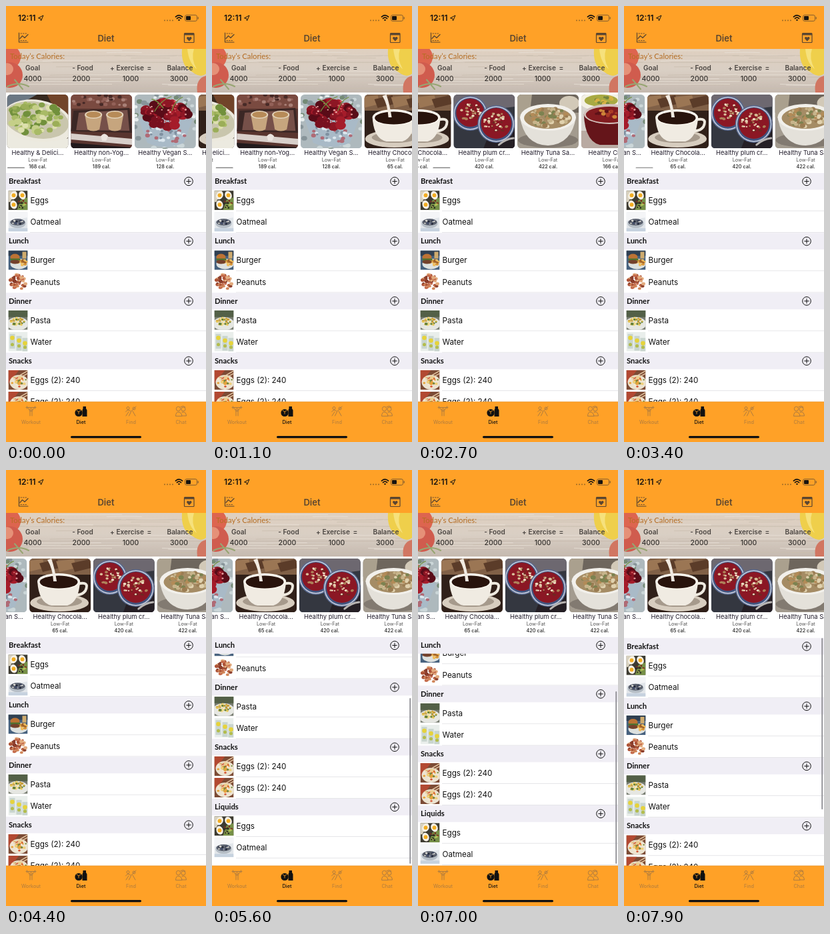
Animation of 300 by 650 pixels, one loop 8000 ms. Source, as an HTML page:

```html
<!DOCTYPE html>
<html lang="en">
<head>
<meta charset="utf-8">
<title>Diet</title>
<style>
  html, body { margin: 0; width: 100%; height: 100%; overflow: hidden; background: #fff; }
  svg { display: block; }
  text { font-family: Inter, Roboto, sans-serif; dominant-baseline: alphabetic; }
  .lato { font-family: Lato, "Open Sans", sans-serif; }
</style>
</head>
<body>
<svg id="stage" width="300" height="650" viewBox="0 0 300 650"></svg>
<script>
const ORANGE = '#ffa127', DIM = '#ad7b3f', PITCH = 95.7, TOP = 249, SECTION = 89.25, HEAD = 24.8, MAX = 106;

// Drawing helpers
const rect = (x, y, w, h, fill, extra = '') => `<rect x="${x}" y="${y}" width="${w}" height="${h}" fill="${fill}" ${extra}/>`;
const oval = (x, y, rx, ry, fill, extra = '') => `<ellipse cx="${x}" cy="${y}" rx="${rx}" ry="${ry}" fill="${fill}" ${extra}/>`;
const disc = (x, y, r, fill, extra) => oval(x, y, r, r, fill, extra);
const path = (d, fill = 'none', extra = '') => `<path d="${d}" fill="${fill}" ${extra}/>`;
const line = (d, color, width = 1) => path(d, 'none', `stroke="${color}" stroke-width="${width}" stroke-linecap="round" stroke-linejoin="round"`);
const text = (s, x, y, size, fill, weight = 400, anchor = 'middle', extra = '') =>
  `<text x="${x}" y="${y}" font-size="${size}" fill="${fill}" font-weight="${weight}" text-anchor="${anchor}" ${extra}>${s}</text>`;
const clip = (id, shape) => `<clipPath id="${id}">${shape}</clipPath>`;

let seed = 7;
const rnd = () => (seed = seed * 16807 % 2147483647) / 2147483647;
function pile(n, x, y, rx, ry, size, colors) {
  let out = '';
  for (let i = 0; i < n; i++) {
    const a = rnd() * 6.283, d = Math.sqrt(rnd());
    const s = size * (0.6 + 0.6 * rnd());
    out += oval((x + Math.cos(a) * d * rx).toFixed(1), (y + Math.sin(a) * d * ry).toFixed(1),
      s.toFixed(1), (s * 0.8).toFixed(1), colors[i % colors.length]);
  }
  return out;
}

// Food pictures, 92 x 80
const plum = (x, y, r) => disc(x, y, r, '#59698f') + disc(x, y, r - 1.5, '#c5cddd') + disc(x, y, r - 3, '#42547f') +
  disc(x, y - 1, r - 5, '#8b1724') + pile(42, x, y - 2, r - 10, r - 12, 2, ['#d9bd98', '#ad8058', '#f0dfc5', '#6c2922']);

const cards = [
  ['Healthy &amp; Delici...', 168,
    rect(0, 0, 92, 80, '#37291f') + path('M0 0H45L0 25Z', '#6b7783') + path('M60 0H92V38L70 20Z', '#71442a') +
    oval(45, 42, 54, 34, '#ece9de', 'transform="rotate(10 45 42)"') + oval(44, 38, 49, 27, '#c9c6ad', 'transform="rotate(10 44 38)"') +
    pile(95, 42, 34, 40, 24, 5, ['#9bae58', '#71903c', '#c5cf88', '#85a04a', '#dde0ad', '#a9bb66']) +
    path('M0 55Q35 80 92 65V80H0Z', '#eceae0')],
  ['Healthy non-Yog...', 189,
    rect(0, 0, 92, 80, '#59352f') + rect(0, 0, 92, 21, '#7a4a40') + path('M0 58L92 66V75L0 67Z', '#d8cfca') + path('M0 72L92 79V80H0Z', '#211a1c') +
    pile(28, 46, 10, 46, 10, 3, ['#472a27', '#936158', '#a98077']) + path('M4 24L88 20L92 57L0 55Z', '#3b2725') +
    path('M12 27L85 23L88 54L8 53Z', '#765049') +
    [34, 66].map(x => path(`M${x - 13} 30L${x - 9} 52Q${x} 57 ${x + 9} 52L${x + 13} 30Z`, '#c6a57e') +
      oval(x, 30, 13, 6, '#e3d4bc') + oval(x, 30, 11, 4.5, '#b78b58')).join('') +
    path('M45 62Q50 55 56 62L53 69H47Z', '#ebe4df')],
  ['Healthy Vegan S...', 128,
    rect(0, 0, 92, 80, '#aeb9bd') + pile(70, 46, 40, 52, 46, 4, ['#cbd6d8', '#879499', '#e6ecec', '#748a76']) +
    path('M6 37H87L74 72Q46 84 19 72Z', '#a9bac7') + pile(36, 46, 58, 30, 14, 3, ['#dbe6ed', '#7f90a0', '#b06a75']) +
    pile(60, 47, 28, 34, 20, 7, ['#78101f', '#a51c2a', '#590c18', '#8d1624']) +
    pile(26, 47, 26, 32, 18, 1.5, ['#e9a4a3', '#d65a5d']) +
    line('M30 25Q40 8 55 3M56 24Q60 9 72 4M43 20Q34 8 26 7', '#73923f', 1.3)],
  ['Healthy Chocola...', 65,
    rect(0, 0, 92, 80, '#302019') + rect(0, 0, 92, 24, '#806047') +
    [8, 30, 55, 78].map((x, i) => path(`M${x - 15} ${4 + i % 2 * 3}L${x + 12} 1L${x + 15} 14L${x - 10} 20Z`, i % 2 ? '#5b3c29' : '#9b7654')).join('') +
    oval(45, 66, 44, 13, '#d7cdbf') + oval(45, 64, 34, 8, '#a69a8c') + line('M72 38Q91 33 84 48Q79 55 69 54', '#eee9df', 4) +
    path('M12 34Q14 66 33 70H57Q74 65 76 34Z', '#f0ebe2') + oval(44, 34, 32, 12, '#faf6ee') + oval(44, 35, 28.5, 9.5, '#28130c') +
    path('M27 2Q35 15 36 34H41Q38 15 33 0Z', '#f1eae1')],
  ['Healthy plum cr...', 420,
    rect(0, 0, 92, 80, '#343740') + path('M0 0H92V18L0 30Z', '#6d6870') + path('M52 62L92 40V80H45Z', '#251f25') +
    plum(25, 28, 26) + plum(64, 44, 28) + line('M68 75Q78 66 90 65', '#b8b4b2', 3)],
  ['Healthy Tuna Sa...', 422,
    rect(0, 0, 92, 80, '#a39b8f') + rect(0, 0, 92, 27, '#6e665d') + path('M0 0H22L18 34H0Z', '#aaa08e') + oval(78, 13, 15, 11, '#d2c9b8') +
    oval(46, 68, 45, 11, '#827a71') + path('M4 33Q10 75 46 76Q82 74 88 33Z', '#e4e1da') + oval(46, 34, 42, 20, '#f2f0eb') + oval(46, 35, 36, 16, '#a58c65') +
    pile(76, 46, 34, 31, 14, 3.4, ['#c7b48b', '#9a7c52', '#e0d1ae', '#7c8250', '#b28b58'])],
  ['Healthy Cinna...', 166,
    rect(0, 0, 92, 80, '#d7d3ce') + rect(0, 54, 92, 26, '#b9aaa2') + oval(30, 10, 33, 14, '#f3f0e4') + oval(30, 9, 25, 9, '#a8aa43') + pile(18, 30, 9, 20, 6, 3, ['#d5b143', '#72833c']) +
    path('M4 29Q6 70 28 75H62Q79 65 80 29Z', '#65151a') + oval(42, 29, 38, 15, '#d3c2bc') + oval(42, 30, 35, 12, '#821c20') +
    pile(18, 41, 28, 20, 6, 3, ['#cd8438', '#aa3a26', '#5d1218']) + line('M80 38Q94 37 87 54Q83 62 75 60', '#dcd2cd', 3)]
];

// Small pictures, 29 x 29
const egg = (x, y, t) => oval(x, y, 5, 6.5, '#f6f1e5', `transform="rotate(${t} ${x} ${y})"`) + disc(x, y, 2.9, '#f2ad22');
const thumbs = {
  eggs: rect(0, 0, 29, 29, '#3d3b31') + path('M0 0H12L3 17H0Z', '#d7d0bd') + path('M18 14L29 10V29H13Z', '#769047') +
    egg(8, 7, 30) + egg(21, 7, -25) + egg(8, 21, -20) + pile(16, 20, 20, 7, 6, 1.7, ['#26251f', '#b1bf58', '#7d2d20']),
  oats: rect(0, 0, 29, 29, '#e2e6ea') + path('M0 0H29V8L0 13Z', '#f4f5f7') + oval(14, 17, 12, 7, '#b6bec6') + oval(14, 15, 11, 5, '#5a606d') +
    pile(18, 14, 15, 9, 3, 1.6, ['#222737', '#d9d8d2', '#424c68']) + rect(0, 24, 29, 5, '#c6d2df'),
  burger: rect(0, 0, 29, 29, '#46617e') + path('M0 0H29V8H0Z', '#304052') + oval(16, 20, 13, 8, '#dde1df') + pile(25, 19, 18, 9, 5, 2, ['#d9983b', '#efbd5d', '#a36328']) +
    oval(10, 10, 7, 5, '#bd7334') + rect(3, 12, 15, 3, '#51722f') + oval(10, 17, 7, 3, '#73412c') + rect(21, 2, 6, 10, '#cfab6e'),
  nuts: rect(0, 0, 29, 29, '#fff') + pile(48, 15, 15, 12, 11, 2.7, ['#ad5337', '#d08558', '#8b3d2b', '#c56b4c', '#e2ab7e']),
  pasta: rect(0, 0, 29, 29, '#777c70') + path('M0 0H29V10H0Z', '#536047') + oval(14, 20, 16, 10, '#e6e7e2') + pile(34, 14, 17, 10, 6, 2, ['#e5c455', '#c69a35', '#f0dc8b', '#66823a']),
  water: rect(0, 0, 29, 29, '#e9eeeb') + [2, 12, 21].map((x, i) => rect(x, 3 + i * 3, 8, 22, '#c9d5cf') + disc(x + 4, 9 + i * 4, 3.3, '#e6d33b') + disc(x + 4, 19 + i * 2, 2.5, '#b3bd4c')).join(''),
  snack: rect(0, 0, 29, 29, '#7c4b35') + path('M0 0H16L0 20Z', '#b24932') + oval(16, 18, 14, 11, '#ece3d0') +
    pile(38, 16, 17, 11, 8, 2.3, ['#e6a33c', '#d45232', '#f0d07a', '#718a3d', '#f1e7d2']) + line('M29 1L8 13M29 5L10 15', '#e6c9a4', 1.5)
};

const eggsRow = ['Eggs', 'eggs'], oatRow = ['Oatmeal', 'oats'], snackRow = ['Eggs (2): 240', 'snack'];
const sections = [
  ['Breakfast', [eggsRow, oatRow]],
  ['Lunch', [['Burger', 'burger'], ['Peanuts', 'nuts']]],
  ['Dinner', [['Pasta', 'pasta'], ['Water', 'water']]],
  ['Snacks', [snackRow, snackRow]],
  ['Liquids', [eggsRow, oatRow]]
];

const cardSvg = ([title, cal, art], i) => `<g transform="translate(${1.5 + i * PITCH} 132)"><g clip-path="url(#cardClip)">${art}</g>` +
  text(title, 46, 90, 9.4, '#211c2b') + text('Low-Fat', 46, 100.2, 7.3, '#555') + text(cal + ' cal.', 46, 109.5, 7.3, '#222', 500) + '</g>';

const rowSvg = ([name, art], y) => `<g transform="translate(3.5 ${y + 1.4})"><g clip-path="url(#thumbClip)">${thumbs[art]}</g>` +
  text(name, 33, 19, 11.7, '#111', 400, 'start') + '</g>' + rect(36, y + 31.5, 264, 0.6, '#d6d5da');

const headSvg = ([name]) => `<g class="head">${rect(0, 0, 300, HEAD, '#f0eef5')}` +
  text(name, 4, 16, 11.3, '#111', 700, 'start', 'class="lato"') +
  disc(274, 12.4, 6.3, 'none', 'stroke="#111" stroke-width="1"') + line('M270.8 12.4H277.2M274 9.2V15.6', '#111') + '</g>';

function banner() {
  let planks = '';
  for (let i = 0; i < 26; i++) {
    const y = 64 + rnd() * 65, x = rnd() * 260;
    planks += line(`M${x} ${y}q35 ${rnd() * 4 - 2} ${40 + rnd() * 100} 0`, i % 2 ? '#c5b6a6' : '#e6ddd2', 0.8);
  }
  const cols = [['Goal', 40, 4000, 40], ['- Food', 115, 2000, 113], ['+ Exercise', 181.5, 1000, 187], ['Balance', 261, 3000, 259.5]];
  return `<g clip-path="url(#bannerClip)">${rect(0, 64, 300, 65, 'url(#wood)')}${planks}` +
    line('M0 84H300M0 106H300', '#bcae9f', 0.8) +
    disc(4, 76, 18, '#d9533b') + disc(6, 103, 19, '#cb493a') + disc(2, 94, 9, '#e28469') + line('M2 120Q19 112 34 120M13 110L25 124', '#8b9b62', 2) +
    path('M264 64Q262 90 279 98Q292 108 300 101V64Z', '#edc936') + path('M272 64Q274 85 286 94Q277 78 282 64Z', '#f5dd6d') +
    path('M300 104Q284 108 287 129H300Z', '#cc6650') + rect(0, 64, 300, 65, '#fff', 'opacity=".1"') + '</g>' +
    text('Today’s Calories:', 6, 79, 11.3, '#b66e24', 400, 'start', 'class="lato"') +
    cols.map(([label, x, value, vx]) => text(label, x, 95.7, 10.1, '#4a4541', 600) + text(value, vx, 112, 10.5, '#35322f', 500)).join('') +
    text('=', 215, 95.7, 10.1, '#4a4541', 600);
}

function navBar() {
  const ink = '#5b4630';
  return rect(0, 0, 300, 64, ORANGE) + text('12:11', 18, 22, 12, '#181410', 600, 'start') +
    path('M48.5 18L56 14L52.5 22L51.7 18.6Z', 'none', 'stroke="#181410" stroke-width="1"') +
    [238, 242, 246, 250].map(x => disc(x, 21.5, 0.9, '#8e6326')).join('') +
    line('M254.5 16.2Q259.5 11.6 264.5 16.2M256.5 18.6Q259.5 15.8 262.5 18.6', '#181410', 1.7) + disc(259.5, 20.9, 1.2, '#181410') +
    rect(268.5, 13.5, 18, 9, 'none', 'rx="2.4" stroke="#86602d"') + rect(270, 15, 7, 6, '#181410', 'rx="1"') + rect(287.6, 16.3, 1.3, 3.4, '#86602d', 'rx=".6"') +
    text('Diet', 150, 52.6, 13, ink, 600) +
    line('M19.5 40V54H33', ink, 1.2) + line('M21 48.5L24.5 44.5L28 47.5L33 42.5', ink, 1.3) + line('M22 51.5H32M22 41H32', ink, 0.9).replace('/>', 'stroke-dasharray="1.5 2"/>') +
    rect(267.5, 40.5, 14.5, 14, 'none', `rx="1" stroke="${ink}" stroke-width="1.2"`) + rect(267.5, 40.5, 14.5, 3, ink) +
    path('M274.8 52.5L271.2 48.8Q270.8 45.8 273.2 46Q274.4 46.2 274.8 47.3Q275.2 46.2 276.4 46Q278.8 45.8 278.4 48.8Z', ink);
}

function tabBar() {
  const labels = ['Workout', 'Diet', 'Find', 'Chat'];
  return rect(0, 590, 300, 60, ORANGE) + rect(0, 589.7, 300, 0.6, '#dd9332') +
    labels.map((s, i) => text(s, 37.5 + 75 * i, 623, 7.3, i === 1 ? '#111' : DIM, i === 1 ? 500 : 400)).join('') +
    line('M30 598.5H45M31.5 596.8V600.2M43.5 596.8V600.2M33 599L36 604V611M42 599L39 604V611M36 604H39', DIM, 1) + disc(37.5, 601.3, 1.5, 'none', `stroke="${DIM}"`) +
    disc(109, 606.5, 5.6, '#111') + line('M106 603L109 605L112 603M109 605V608', ORANGE, 0.8) + path('M115.5 597H120V600L121.5 602.5V612H114.5V602.5L115.5 600Z', '#111') +
    disc(183, 599.5, 2, 'none', `stroke="${DIM}"`) + disc(192, 600, 2, 'none', `stroke="${DIM}"`) + line('M179.5 605Q183 600 187.5 604.5L195 597M184 605L180 611M190 604L194 611M187.5 605L184.5 611', DIM) +
    disc(258.5, 600.5, 3.2, 'none', `stroke="${DIM}"`) + disc(266, 601, 3, 'none', `stroke="${DIM}"`) + line('M254.5 611Q255 604 260 605.5Q264 607 264 611ZM264 605.5Q270 604 270.5 611H264M262 597.5Q266 595 269 598', DIM) +
    rect(97, 641, 106, 3.2, '#111', 'rx="1.6"');
}

const stage = document.getElementById('stage');
stage.innerHTML = `<defs>
  <linearGradient id="wood" x2="0" y2="1"><stop stop-color="#dbcbb9"/><stop offset=".5" stop-color="#d5c9bd"/><stop offset="1" stop-color="#beb1a6"/></linearGradient>
  ${clip('cardClip', rect(0, 0, 92, 80.5, '#000', 'rx="6"'))}${clip('thumbClip', rect(0, 0, 29, 29, '#000'))}
  ${clip('bannerClip', rect(0, 64, 300, 65, '#000'))}${clip('listClip', rect(0, TOP, 300, 341, '#000'))}</defs>
  ${rect(0, 0, 300, 650, '#fff')}
  <g id="cards">${cards.map(cardSvg).join('')}</g>
  ${rect(2, 240.3, 26, 1.8, '#999', 'id="hbar" rx=".9"')}
  <g clip-path="url(#listClip)">
    <g id="rows">${sections.map(([, rows], i) => rows.map((r, j) => rowSvg(r, TOP + SECTION * i + HEAD + 32.1 * j)).join('')).join('')}</g>
    ${sections.map(headSvg).join('')}
    ${rect(296.3, TOP, 1.9, 257, '#8f8f94', 'id="vbar" rx=".9"')}
  </g>` + banner() + navBar() + tabBar();

// Piecewise linear tracks of [time, value]
function track(points, t) {
  const i = points.findIndex(p => p[0] > t);
  if (i === 0) return points[0][1];
  if (i < 0) return points[points.length - 1][1];
  const [t0, a] = points[i - 1], [t1, b] = points[i];
  return a + (b - a) * (t - t0) / (t1 - t0);
}
const slide = [[900, 0], [1000, 18], [1100, 60], [1300, 180], [1500, 280], [1600, 312], [1700, 331], [1800, 342.3], [2200, 345],
  [2500, 345], [2600, 340], [2700, 331], [2800, 302], [2900, 270], [3000, 253.5]];
const slideBar = [[0, 1], [500, 0], [900, 0], [1000, 1], [3300, 1], [3800, 0]];
const scroll = [[5200, 0], [5300, 18], [5400, 62], [5500, 101], [5600, 116], [5700, 112], [5900, 107], [6100, MAX], [7000, MAX],
  [7100, 96], [7200, 74], [7400, 26], [7500, 6], [7600, -7], [7700, -6], [7900, -1.5]];

const byId = id => document.getElementById(id);
const cardsEl = byId('cards'), rowsEl = byId('rows'), hbar = byId('hbar'), vbar = byId('vbar');
const heads = [...document.querySelectorAll('.head')];
const move = (el, x, y) => el.setAttribute('transform', `translate(${x} ${y})`);

function draw(now) {
  const t = Math.floor(now % 8000 / 100) * 100;
  const x = track(slide, t), y = track(scroll, t);
  move(cardsEl, -x, 0);
  move(hbar, x * 0.0614, 0);
  hbar.setAttribute('opacity', track(slideBar, t));
  move(rowsEl, 0, -y);
  heads.forEach((h, i) => {
    const natural = TOP + SECTION * i - y;
    move(h, 0, Math.min(Math.max(natural, TOP), natural + SECTION - HEAD));
  });
  const over = Math.max(0, -y, y - MAX), part = Math.min(1, Math.max(0, y / MAX));
  vbar.setAttribute('height', 257 - over);
  vbar.setAttribute('y', TOP + 1.5 + part * (79.5 + over));
  vbar.setAttribute('opacity', t >= 5300 ? 1 : 0);
  requestAnimationFrame(() => draw(performance.now() - start));
}
const start = performance.now();
draw(0);
</script>
</body>
</html>
```
